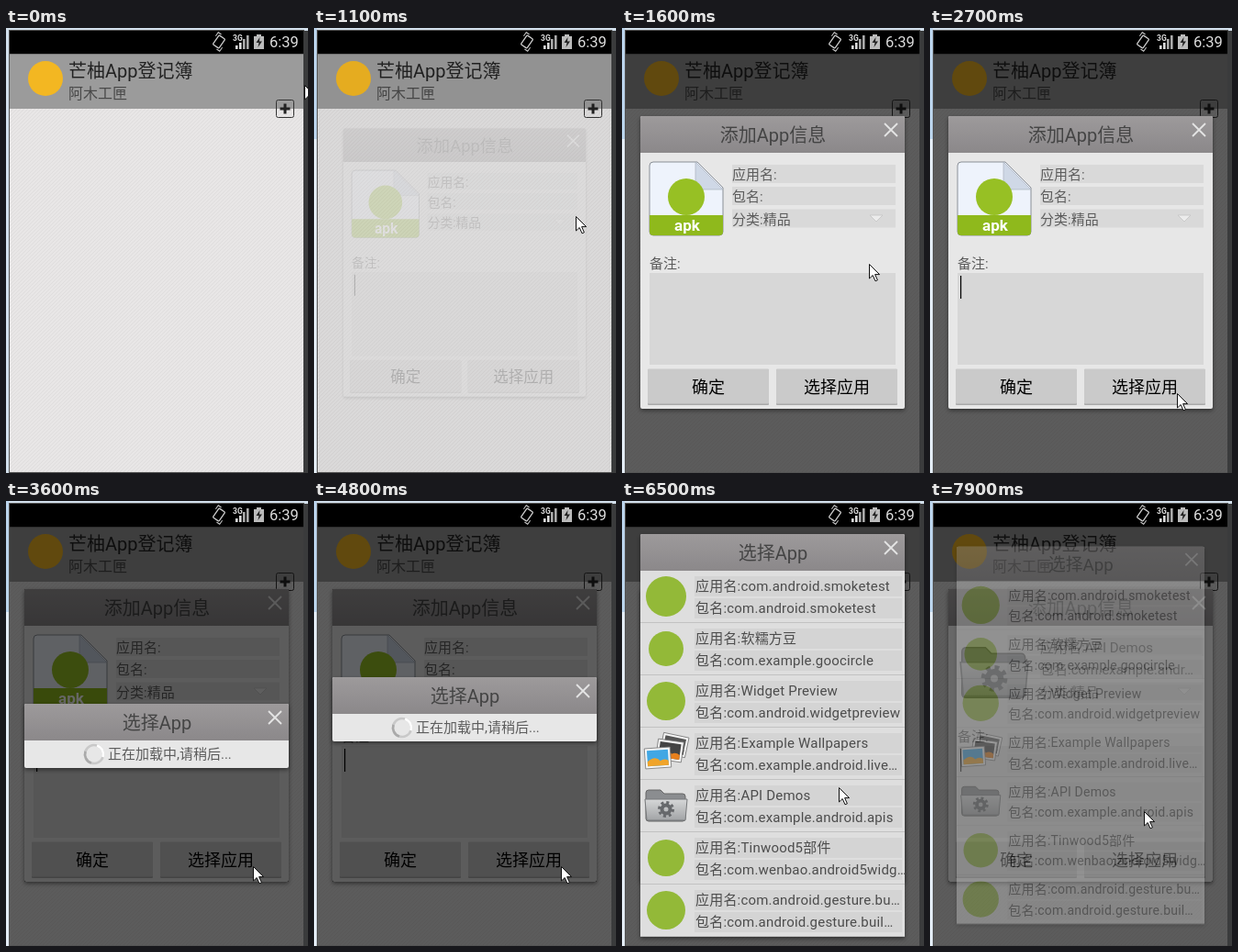
An HTML page for the animation above (8000 ms loop, 329 by 485 pixels).

```html
<!DOCTYPE html>
<html lang="zh-CN">
<head>
<meta charset="utf-8">
<title>App</title>
<style>
html, body { margin: 0; height: 100%; overflow: hidden; background: #d3e0ec; }
svg { display: block; width: 100vw; height: 100vh; }
text { font-family: Roboto, "Noto Sans CJK SC", "Noto Sans CJK", sans-serif; white-space: pre; }
.dlg { filter: drop-shadow(0 2px 2px #0007); }
</style>
</head>
<body>
<script>
const rect = (x, y, w, h, fill, more = '') =>
  `<rect x="${x}" y="${y}" width="${w}" height="${h}" fill="${fill}" ${more}/>`;
const text = (x, y, size, fill, str, more = '') =>
  `<text x="${x}" y="${y}" font-size="${size}" fill="${fill}" ${more}>${str}</text>`;
const path = (d, fill, more = '') => `<path d="${d}" fill="${fill}" ${more}/>`;
const disc = (x, y, r, fill) => `<circle cx="${x}" cy="${y}" r="${r}" fill="${fill}"/>`;
const line = (d, color, w) => path(d, 'none', `stroke="${color}" stroke-width="${w}"`);
const group = (id, body, more = '') => `<g id="${id}" ${more}>${body}</g>`;
const at = (x, y, body, more = '') => `<g transform="translate(${x} ${y}) ${more}">${body}</g>`;
const mid = 'text-anchor="middle"';

const panel = (y, h, title) =>
  rect(20, y, 288, h, '#e7e7e7', 'rx="2"') +
  path(`M20 ${y + 40}v-38q0-2 2-2h284q2 0 2 2v38z`, 'url(#bar)') +
  text(164.5, y + 28, 20, '#444', title, mid) +
  line(`M286 ${y + 8}l14 14m0-14l-14 14`, '#e4e4e4', 1.8);

const folder =
  path('M-22-14q0-3 3-3h13l4 4h20q3 0 3 3v24q0 3-3 3h-37q-3 0-3-3z', '#8b8d90', 'stroke="#666" stroke-width="1"') +
  path('M-23-7h46l-2 23h-42z', 'url(#metal)', 'stroke="#77797b" stroke-width="1"') +
  `<circle cy="4" r="7.5" fill="none" stroke="#66686b" stroke-width="3" stroke-dasharray="3 2.9"/>` +
  `<circle cy="4" r="4.5" fill="none" stroke="#66686b" stroke-width="4"/>`;

const photo = (x, y, angle, fill, hill) => at(x, y,
  rect(-14, -11, 28, 22, '#f6f6f6', 'stroke="#777" stroke-width=".8"') +
  rect(-11.5, -8.5, 23, 17, fill) + path('M-11.5 8.5v-5q9-7 14 0q4-3 9 0v5z', hill), `rotate(${angle})`);
const photos = photo(9, -9, 12, '#555', '#333') + photo(4, -3, 8, '#444', '#e8801c') +
  photo(-9, 5, -4, '#41a7e4', '#f0a42a');

const green = r => disc(0, 0, r, '#93b938');

const statusBar =
  rect(4, 3, 320, 25, '#000') +
  at(232, 15, rect(-4, -6, 8, 12, 'none', 'rx="1" stroke="#ccc" stroke-width="1.3"') +
    line('M-6.5-3v-5h4M6.5 3v5h-4', '#ccc', 1), 'rotate(35)') +
  text(247, 14, 8.5, '#ddd', '3G', 'font-weight="bold"') +
  [4, 7, 11, 15].map((h, i) => rect(250 + i * 4, 23 - h, 2.6, h, i < 2 ? '#ddd' : '#aaa')).join('') +
  path('M270 9h3v-2h5v2h3v14h-11z', '#bbb') + path('M276.5 10l-4 6h3l-1 5l4.5-6.5h-3z', '#222') +
  text(287, 21, 16.5, '#ddd', '6:39');

const home =
  rect(4, 28, 320, 456, '#e8e6e6') + rect(4, 28, 320, 456, 'url(#weave)') +
  rect(4, 28, 320, 60, '#9b9b9b') + rect(4, 28, 320, 1, '#777') +
  disc(43, 55, 19, '#f3b722') +
  text(68, 54, 20, '#222', '芒柚App登记簿') + text(68, 77, 16, '#484848', '阿木工匣') +
  rect(294.5, 78.5, 19, 19, 'none', 'rx="2" stroke="#333"') + line('M298.5 88h11m-5.5-5.5v11', '#222', 3);

const field = (y, str, id) => rect(120, y, 178, 20, '#d9d9d9') +
  text(120, y + 16, 15, '#5c5c5c', str, id ? `id="${id}"` : '');
const button = (x, label, id) =>
  rect(x, 372, 132, 39, '#aaa', 'rx="1"') + rect(x, 371.5, 132, 38, '#cacaca', `rx="1" id="${id}"`) +
  text(x + 66, 398, 18, '#000', label, mid);

const apk =
  path('M34 146h48l28 28v48q0 4-4 4h-72q-4 0-4-4v-72q0-4 4-4z', '#eef3fc', 'stroke="#8a8f96" stroke-width="1"') +
  path('M80 146l30 30h-26q-4 0-4-4z', '#cfd8e6', 'stroke="#aab2be" stroke-width=".7"') +
  at(70, 184, disc(0, 0, 20, '#97c024')) +
  path('M30 204h80v18q0 4-4 4h-72q-4 0-4-4z', '#8fb91c') +
  text(71, 221, 17, '#fff', 'apk', mid + ' font-weight="bold"');

const addPanel = panel(96, 319, '添加App信息') +
  group('apk', apk) + group('picked', at(70, 187, folder, 'scale(1.6)')) +
  field(149, '应用名:', 'name') + field(173, '包名:', 'pack') + field(197.5, '分类:精品') +
  path('M270 204h14l-7 7z', '#ececec', 'stroke="#c4c4c4" stroke-width=".8"') +
  text(30, 262, 15, '#5c5c5c', '备注:') + rect(30, 267, 268, 100, '#d7d7d7') +
  rect(33, 270, 1.2, 25, '#000', 'id="caret"') +
  button(28, '确定', 'ok') + button(168, '选择应用', 'choose');

const loadPanel = panel(0, 70, '选择App') +
  at(96, 55, group('spin',
    `<circle r="10" fill="none" stroke="#c9c9c9" stroke-width="2.6"/>` +
    line('M-10 0a10 10 0 0 1 10-10', '#fff', 2.6) + line('M10 0a10 10 0 0 1-10 10', '#aaa', 2.6))) +
  text(111, 60, 15, '#5c5c5c', '正在加载中,请稍后...');

const apps = [
  [green(22), 'com.android.smoketest', 'com.android.smoketest'],
  [green(19), '软糯方豆', 'com.example.goocircle'],
  [green(21), 'Widget Preview', 'com.android.widgetpreview'],
  [photos, 'Example Wallpapers', 'com.example.android.live…'],
  [folder, 'API Demos', 'com.example.android.apis'],
  [green(20), 'Tinwood5部件', 'com.wenbao.android5widg…'],
  [green(21), 'com.android.gesture.bu…', 'com.android.gesture.buil…']
];
const row = ([icon, name, pack], i) => {
  const y = 76 + 57 * i;
  const label = (dy, str) => rect(79, y + dy, 226, 22, '#d4d4d4') +
    text(80, y + dy + 16, 15, '#4c4c4c', str, 'letter-spacing=".2"');
  return rect(20, y, 288, 56, '#dedede', `id="row${i}"`) + rect(20, y + 56, 288, 1, '#c2c2c2') +
    at(48, y + 28, icon) + label(6, '应用名:' + name) + label(30, '包名:' + pack);
};
const listPanel = panel(36, 438, '选择App') + apps.map(row).join('');

const grad = (id, a, b) => `<linearGradient id="${id}" x2="0" y2="1"><stop stop-color="${a}"/>` +
  `<stop offset="1" stop-color="${b}"/></linearGradient>`;

document.body.innerHTML = `<svg viewBox="0 0 329 485" preserveAspectRatio="none"><defs>
  ${grad('bar', '#9d9a9b', '#8b888a')}${grad('metal', '#d6d7d8', '#a2a4a6')}
  <pattern id="weave" width="4" height="4" patternUnits="userSpaceOnUse">
  <path d="M-1 1l2-2M0 4l4-4M3 5l2-2" stroke="#dedcdc" stroke-width=".9"/></pattern></defs>` +
  rect(0, 0, 329, 485, '#d3e0ec') + group('edge', rect(0, 0, 3, 121, '#bcd5ed') + rect(0, 121, 3, 364, '#e4edf6')) +
  rect(3, 2, 322, 483, '#555') + rect(324, 3, 5, 482, '#3a3b3c') + home + statusBar +
  rect(4, 28, 320, 456, '#000', 'id="dim"') +
  group('add', addPanel, 'class="dlg"') + rect(20, 96, 288, 319, '#000', 'id="shade"') +
  group('load', loadPanel, 'class="dlg"') + group('list', listPanel, 'class="dlg"') +
  group('mouse', path('M.5.5v15.5l3.7-3.5l2.8 6.3l2.4-1l-2.8-6.2h5z', '#fff', 'stroke="#111"')) + '</svg>';

const $ = id => document.getElementById(id);
const set = (id, name, value) => $(id).setAttribute(name, value);
const show = (id, on) => set(id, 'display', on ? 'inline' : 'none');
const zoom = (id, s, y) => set(id, 'transform', `translate(164 ${y}) scale(${s}) translate(-164 ${-y})`);

// Linear interpolation through [time, value, time, value, ...]
function key(t, k) {
  if (t <= k[0]) return k[1];
  for (let i = 2; i < k.length; i += 2)
    if (t <= k[i]) return k[i - 1] + (k[i + 1] - k[i - 1]) * (t - k[i - 2]) / (k[i] - k[i - 2]);
  return k[k.length - 1];
}

function draw(t) {
  const x = key(t, [0, 325, 400, 308, 500, 308, 600, 312, 800, 297, 900, 297, 1000, 285, 1400, 285,
    1600, 269, 6000, 269, 6500, 236, 6900, 236, 7100, 233]);
  const y = key(t, [0, 62, 400, 82, 500, 82, 800, 202, 900, 202, 1000, 205, 1400, 205,
    1600, 257, 1900, 398, 6000, 398, 6500, 312, 6900, 312, 7100, 338]);
  set('mouse', 'transform', `translate(${x} ${y})`);
  show('edge', t >= 400);

  set('dim', 'opacity', key(t, [900, 0, 1100, .06, 1300, .5, 1400, .5, 1500, .6]));
  set('add', 'opacity', key(t, [900, 0, 1100, .18, 1300, 1]));
  zoom('add', key(t, [1000, .86, 1100, .917, 1300, 1]), 255.5);
  show('caret', t < 1500 || t >= 1900);
  set('choose', 'fill', t >= 2200 && t < 2700 ? '#b2b2b2' : '#cacaca');

  const done = t >= 7900;
  show('apk', !done);
  show('picked', done);
  $('name').textContent = '应用名:' + (done ? 'API Demos' : '');
  $('pack').textContent = '包名:' + (done ? 'com.example.andr…' : '');
  set('shade', 'opacity', key(t, [3000, 0, 3200, .6, 7800, .6, 7900, .55]));

  show('load', t >= 3100 && t < 5500);
  set('load', 'opacity', key(t, [3000, 0, 3100, .35, 3200, 1]));
  const s = key(t, [3100, .94, 3200, 1]);
  const top = key(t, [4700, 221, 4800, 192, 5300, 36]);
  set('load', 'transform', `translate(164 ${top + 35}) scale(${s}) translate(-164 -35)`);
  set('spin', 'transform', `rotate(${key(t, [3300, 0, 4100, 288, 4200, 288, 4600, 432, 4700, 432, 5300, 648])})`);

  show('list', t >= 5500);
  set('list', 'opacity', done ? .35 : 1);
  zoom('list', done ? .9375 : 1, 255);
  set('row4', 'fill', t >= 7600 && !done ? '#bdbdbd' : '#dedede');
}

function tick() {
  draw(Math.floor(performance.now() % 8000 / 100) * 100);
  requestAnimationFrame(tick);
}
tick();
</script>
</body>
</html>
```
